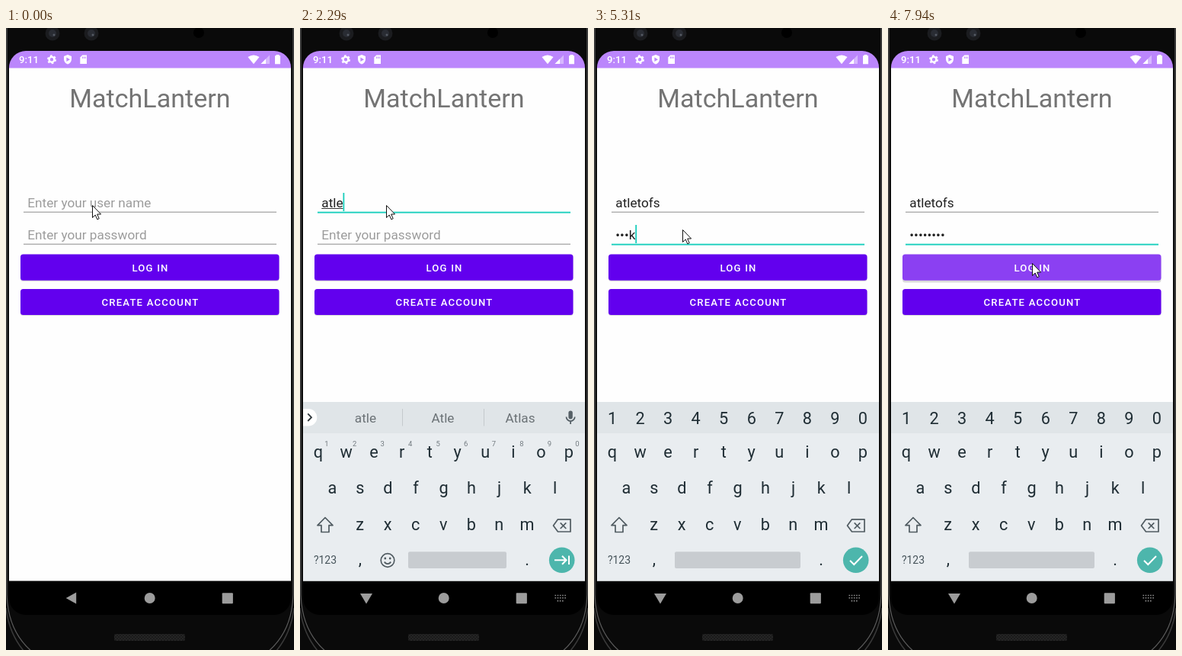
Write an HTML page that moves like this. It is 378 px wide and 815 px high and loops after 8000 ms.

```html
<!DOCTYPE html>
<html lang="en">
<head>
<meta charset="utf-8">
<title>Log in</title>
<style>
  html, body { margin: 0; width: 100%; height: 100%; overflow: hidden; background: #000; }
  svg { display: block; width: 378px; height: 815px; }
  text { font-family: Roboto, "Noto Sans", sans-serif; font-size: 17.2px; white-space: pre; }
  .mid { text-anchor: middle; }
  .title { font-size: 34.1px; fill: #747474; }
  .hint { fill: #9c9c9c; }
  .typed { fill: #202020; }
  .btn { font-size: 13.15px; font-weight: 500; letter-spacing: 1.18px; fill: #fff; }
  .key { font-size: 21.7px; fill: #1f2d34; }
  .sup { font-size: 9.5px; fill: #737b80; }
  .word { fill: #6b7276; }
  .line { fill: none; stroke: #505b61; stroke-width: 1.7; }
  .white { fill: none; stroke: #fff; stroke-width: 2; }
</style>
</head>
<body>
<svg viewBox="0 0 378 815">
  <defs>
    <clipPath id="screen"><rect x="4" y="30" width="370" height="739" rx="22"/></clipPath>
    <pattern id="mesh" width="4" height="4" patternUnits="userSpaceOnUse">
      <rect width="4" height="4" fill="#1b1b1b"/>
      <path d="M0 0L4 4M4 0L0 4" stroke="#2a2a2a" stroke-width=".7"/>
    </pattern>
  </defs>

  <!-- device -->
  <rect width="378" height="815" fill="#0a0a0a"/>
  <g fill="none">
    <path d="M1 0V742C2 775 14 800 34 817M377 0V742C376 775 364 800 344 817" stroke="#5c5c5c" stroke-width="1.2"/>
    <path d="M0 760C3 785 12 803 24 817M378 760C375 785 366 803 354 817" stroke="#3a3a3a" stroke-width="1.5"/>
  </g>
  <g id="cams"></g>
  <circle cx="253" cy="6" r="7" fill="#000"/>
  <rect x="142" y="794" width="93" height="9" rx="2" fill="url(#mesh)"/>

  <g clip-path="url(#screen)">
    <rect x="4" y="30" width="370" height="739" fill="#000"/>
    <rect x="4" y="52" width="370" height="672.5" fill="#fefefe"/>
    <rect x="4" y="30" width="370" height="22.5" fill="#bb86fc"/>

    <!-- status bar -->
    <text x="17" y="46" fill="#fff" style="font-size:13.2px;font-weight:500">9:11</text>
    <g fill="none" stroke="#fff">
      <circle cx="60" cy="41.3" r="3.4" stroke-width="2.4"/>
      <circle cx="60" cy="41.3" r="5" stroke-width="2" stroke-dasharray="2.6 2.636"/>
    </g>
    <path d="M81 35L86 37V41C86 44 84 46.4 81 47.4C78 46.4 76 44 76 41V37Z" fill="#fff"/>
    <path d="M79.4 38.4V44L84 41.2Z" fill="#bb86fc"/>
    <path d="M100.3 35.5H106V47H97.3V38.6Z" fill="#fff"/>
    <path d="M100.4 37.5V40M102.4 37.5V40M104.3 37.5V40" stroke="#bb86fc"/>
    <path d="M317.5 38Q325 33 332.5 38L325 47.3Z" fill="#fff"/>
    <path d="M346 35.5V47H334.5Z" fill="#fff" opacity=".4"/>
    <path d="M341 40.5V47H334.5Z" fill="#fff"/>
    <path d="M354.6 35H358.4V36.3H360V47.3H353V36.3H354.6Z" fill="#fff"/>

    <!-- form -->
    <text class="mid title" x="189" y="104">MatchLantern</text>
    <g id="fields"></g>
    <rect id="shade" x="19" y="298" width="339.5" height="34" rx="3.5" opacity=".14"/>
    <rect id="login" x="19" y="296.5" width="339.5" height="34.3" rx="3.5"/>
    <text class="mid btn" x="189.5" y="318.7">LOG IN</text>
    <rect x="19" y="343.5" width="339.5" height="33.5" rx="3.5" opacity=".14"/>
    <rect x="19" y="342" width="339.5" height="34" rx="3.5" fill="#6200ee"/>
    <text class="mid btn" x="189.5" y="364">CREATE ACCOUNT</text>

    <!-- navigation bar -->
    <g fill="#9c9c9c">
      <path id="back"/>
      <circle cx="188.7" cy="747" r="7"/>
      <rect x="283.7" y="740.2" width="14.2" height="14" rx="1"/>
      <path id="imeIcon" d="M334.5 743.5H349M334.5 746.7H349M337.6 750.6H346" fill="none" stroke="#8c8c8c" stroke-width="1.6" stroke-dasharray="1.6 1.6"/>
    </g>

    <!-- keyboard -->
    <g id="keyboard">
      <rect x="4" y="490" width="370" height="234.5" fill="#e9edf0"/>
      <rect x="4" y="490" width="370" height="41" fill="#e0e5e8"/>
      <g id="letters"></g>
      <path class="line" d="M33 641.5L43 651.7H38V660.5H28V651.7H23Z" stroke-linejoin="round"/>
      <path class="line" d="M338.5 643.8H355V660H338.5L332.5 652Z" stroke-linejoin="round"/>
      <path class="line" d="M341.7 648.4L349.3 656M349.3 648.4L341.7 656"/>
      <text class="mid" x="33" y="702.3" fill="#46535a" style="font-size:14px">?123</text>
      <text class="mid key" x="79" y="703">,</text>
      <text class="mid key" x="298" y="703.5">.</text>
      <rect id="space" y="686.3" height="21.8" rx="2" fill="#c8ccd0"/>
      <circle cx="343.7" cy="697.3" r="16.8" fill="#4db6ac"/>
      <g id="textMode">
        <path id="dividers" d="M134.5 499V521.5M241.5 499V521.5" stroke="#c5cacd"/>
        <g id="words"></g>
        <path d="M4 499H11A11.3 11.3 0 0 1 11 521.6H4Z" fill="#fff"/>
        <path d="M10.3 505.4L15 510.2L10.3 515" fill="none" stroke="#30383c" stroke-width="1.8"/>
        <rect x="352.4" y="501.5" width="5.4" height="11" rx="2.7" fill="#566066"/>
        <path class="line" d="M349.5 509.5A5.6 5.6 0 0 0 360.7 509.5M355.1 515V519" stroke-width="1.6"/>
        <circle class="line" cx="115" cy="697.5" r="8.8"/>
        <circle cx="111.8" cy="695" r="1.4" fill="#505b61"/>
        <circle cx="118.2" cy="695" r="1.4" fill="#505b61"/>
        <path class="line" d="M110.8 699.5A4.7 4.7 0 0 0 119.2 699.5"/>
        <path class="white" d="M334 697.3H349M344 691.8L349.5 697.3L344 702.8M353 691.5V703"/>
      </g>
      <g id="passMode">
        <path class="white" d="M336 697.8L341.3 703L352 692"/>
      </g>
    </g>
  </g>
  <path id="mouse" d="M.5 .5V16.5L4.2 13L6.8 18.8L9.2 17.7L6.7 12H11.6Z" fill="#fff" stroke="#111" stroke-width="1"/>
</svg>
<script>
const LOOP = 8000;
const PASSWORD = "aflktofs";
const $ = id => document.getElementById(id);

function add(parent, tag, attrs, text = "") {
  const el = document.createElementNS("http://www.w3.org/2000/svg", tag);
  for (const k in attrs) el.setAttribute(k, attrs[k]);
  el.textContent = text;
  parent.appendChild(el);
  return el;
}

// Each track lists [start time, value...]; the last started step holds.
const tracks = {
  keyboard: [[0, 0, 0], [530, 28, .35], [650, 15.7, .78], [770, 0, 1]],
  user: [[0, ""], [1020, "a"], [1270, "at"], [2040, "atl"], [2290, "atle"],
    [2570, "atlet"], [2690, "atleto"], [2940, "atletof"], [3320, "atletofs"]],
  words: [[0, "thanks", "I", "we"], [1020, "a", "and", "after"], [1270, "at", "At", "ate"],
    [2040, "atl", "Atl", "Atlas"], [2290, "atle", "Atle", "Atlas"], [2570, "atlet", "Atlet", "apply"],
    [2690, "", "atleto", ""], [2940, "", "atletof", ""], [3320, "", "atletofs", ""]],
  pass: [[0, 0], [4570, 1], [4810, 2], [5060, 3], [5310, 4], [5560, 5], [5680, 6], [5930, 7], [6310, 8]],
  focus: [[0, -1], [410, 0], [3960, 1]],
  caret: [[0, 0], [530, 1], [1790, 0], [2040, 1], [3720, 0], [3960, 1],
    [6820, 0], [7300, 1], [7680, 0]],
  mouse: [[0, 113, 232], [3470, 113, 238], [3590, 115, 249], [3720, 115, 258], [3840, 116, 264],
    [6700, 132, 276], [6820, 150, 297], [6940, 168, 326], [7060, 181, 346],
    [7180, 187, 326], [7300, 189, 308]],
  login: [[0, "#6200ee"], [7820, "#7822f0"], [7940, "#8b40f2"]]
};
const at = (name, t) => tracks[name].findLast(step => step[0] <= t).slice(1);
const show = (el, on) => el.setAttribute("display", on ? "inline" : "none");

for (const x of [61, 112]) {
  add($("cams"), "circle", { cx: x, cy: 7, r: 9.5, fill: "#1b1c1f" });
  add($("cams"), "circle", { cx: x, cy: 7, r: 5, fill: "#292c33" });
  add($("cams"), "circle", { cx: x + 2, cy: 9, r: 1.5, fill: "#555a63" });
}

const fields = [["Enter your user name", 235], ["Enter your password", 277]].map(([hint, y]) => {
  const box = $("fields");
  return {
    hint: add(box, "text", { class: "hint", x: 28.3, y }, hint),
    text: add(box, "text", { class: "typed", x: 28.3, y }),
    under: add(box, "rect", { x: 28.3, y: y + 1, height: 1, fill: "#333" }),
    rule: add(box, "rect", { x: 23, y: y + 5.7, width: 332 }),
    caret: add(box, "rect", { y: y - 19, width: 1.8, height: 24, fill: "#17cdbb" })
  };
});

const PITCH = 36.55;
[["qwertyuiop", 24, 563], ["asdfghjkl", 42.3, 610], ["zxcvbnm", 78.6, 658]].forEach(([row, x, y]) =>
  [...row].forEach((c, i) => add($("letters"), "text", { class: "mid key", x: x + PITCH * i, y }, c)));
[..."1234567890"].forEach((c, i) => {
  const x = 24 + PITCH * i;
  add($("textMode"), "text", { class: "mid sup", x: x + 11, y: 547.5 }, c);
  add($("passMode"), "text", { class: "mid key", x, y: 519 }, c);
});
const words = [86, 187.5, 289].map(x => add($("words"), "text", { class: "mid word", x, y: 517 }));

function drawField(f, value, focused, caretOn, composing) {
  f.text.textContent = value;
  show(f.hint, !value);
  const w = value ? f.text.getComputedTextLength() : 0;
  show(f.under, composing && value);
  f.under.setAttribute("width", w);
  f.rule.setAttribute("height", focused ? 1.9 : 1);
  f.rule.setAttribute("fill", focused ? "#1bd0be" : "#8d8d8d");
  f.caret.setAttribute("x", 28.2 + w);
  show(f.caret, focused && caretOn);
}

function draw(t) {
  const [focus] = at("focus", t), [caret] = at("caret", t);
  const [user] = at("user", t), [count] = at("pass", t);
  const hidden = t >= 7680 ? count : Math.max(0, count - 1);
  const secret = "•".repeat(hidden) + PASSWORD.slice(hidden, count);
  drawField(fields[0], user, focus === 0, caret, focus === 0);
  drawField(fields[1], secret, focus === 1, caret, false);

  const [drop, alpha] = at("keyboard", t);
  $("keyboard").setAttribute("transform", `translate(0 ${drop})`);
  $("keyboard").setAttribute("opacity", alpha);
  show($("imeIcon"), alpha);
  $("back").setAttribute("d", alpha ? "M79 741H95L87 754.5Z" : "M92.2 739.5V754.5L78.7 747Z");

  const secretKeys = t >= 4080;
  show($("textMode"), !secretKeys);
  show($("passMode"), secretKeys);
  $("space").setAttribute("x", secretKeys ? 106 : 142);
  $("space").setAttribute("width", secretKeys ? 165 : 129);
  const list = at("words", t);
  list.forEach((w, i) => words[i].textContent = w);
  show($("dividers"), list[0]);

  $("login").setAttribute("fill", at("login", t)[0]);
  $("shade").setAttribute("y", t >= 7820 ? 299.5 : 298);
  $("mouse").setAttribute("transform", `translate(${at("mouse", t).join(" ")})`);
}

const start = performance.now();
function tick() {
  draw((performance.now() - start) % LOOP);
  requestAnimationFrame(tick);
}
tick();
</script>
</body>
</html>
```
